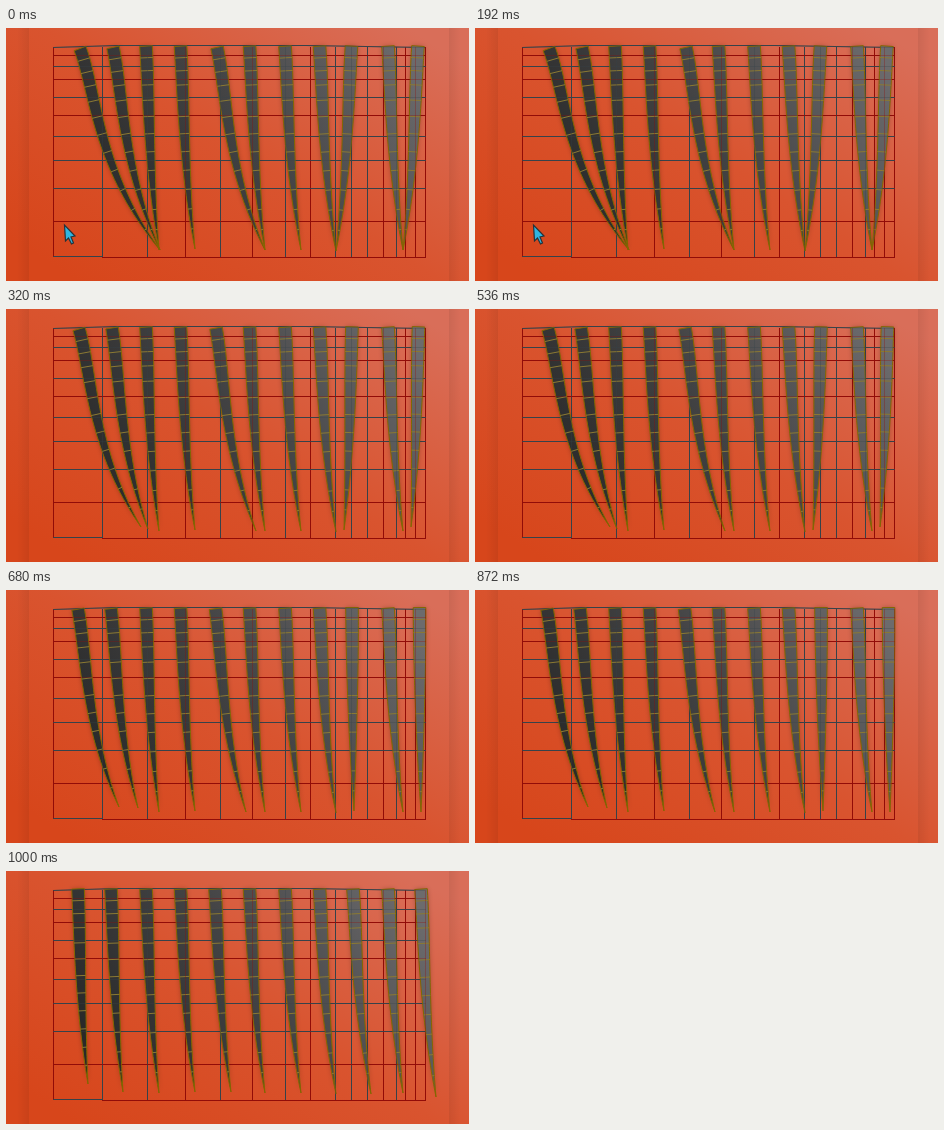
An HTML page with a canvas that plays this animation: 463x253 px, repeating every 1320 ms.

```html
<!DOCTYPE html>
<html lang="en">
<head>
<meta charset="utf-8">
<title>Bending blades</title>
<style>
html, body { margin: 0; width: 100%; height: 100%; overflow: hidden; background: #d9501f; }
canvas { display: block; width: 463px; height: 253px; }
</style>
</head>
<body>
<canvas id="stage" width="463" height="253"></canvas>
<script>
const ctx = document.getElementById('stage').getContext('2d');
const LOOP = 1320;
const POSE_STARTS = [0, 320, 680, 1000];
const RED = '#920d08', SLATE = '#37424a', OLIVE = '#836700';

const columns = [47, 96, 141, 179, 214, 246, 279, 304, 329, 345, 361, 377, 390, 399, 409, 419];
const rows = [19, 27, 38, 51, 69, 87, 108, 132, 160, 193, 228];
const redColumns = [47, 179, 246, 304, 377, 399, 409, 419];
const redRows = [27, 51, 87, 193];

// Each blade: resting top x, resting tip [x, y], and, if it moves, earlier [top x, tip x, tip y] poses.
const blades = [
  { top: 72, tip: [82, 213], bent: [[74, 154, 222], [73, 135, 218], [72, 113, 217]] },
  { top: 105, tip: [117, 221], bent: [[107, 154, 222], [106, 142, 220], [105, 132, 218]] },
  { top: 140, tip: [153, 222] },
  { top: 174.5, tip: [189, 221] },
  { top: 209, tip: [225, 221], bent: [[211, 259, 222], [210, 250, 222], [209.5, 240, 222]] },
  { top: 243.5, tip: [259, 222] },
  { top: 279, tip: [295, 222] },
  { top: 313.5, tip: [330, 223] },
  { top: 347, tip: [365, 223], bent: [[345.5, 330, 223], [346, 338, 221], [346, 348, 221]] },
  { top: 382, tip: [397, 222] },
  { top: 415, tip: [430, 226], bent: [[412, 397, 222], [412.5, 405, 218], [413.5, 415, 222]] }
];

function gradient(x0, y0, x1, y1, ...colors) {
  const g = ctx.createLinearGradient(x0, y0, x1, y1);
  colors.forEach((c, i) => g.addColorStop(i / (colors.length - 1), c));
  return g;
}

const backdrop = gradient(130, 290, 340, -40, '#d7461b', '#d9542f', '#d96e59');
const metal = gradient(110, 210, 400, 20, '#292929', '#444445', '#6c6b6d');

function drawBackdrop() {
  ctx.fillStyle = backdrop;
  ctx.fillRect(0, 0, 463, 253);
  ctx.fillStyle = gradient(11, 0, 23, 0, '#0000', '#0001');
  ctx.fillRect(11, 0, 12, 253);
  ctx.fillStyle = gradient(443, 0, 455, 0, '#0001', '#0000');
  ctx.fillRect(443, 0, 12, 253);
}

function drawGrid(alpha) {
  ctx.globalAlpha = alpha;
  const [left, right] = [columns[0], columns.at(-1)];
  const [top, bottom] = [rows[0], rows.at(-1)];
  for (const x of columns) {
    ctx.fillStyle = redColumns.includes(x) ? RED : SLATE;
    ctx.fillRect(x, top, 1, bottom - top + 1);
  }
  for (const y of rows) {
    ctx.fillStyle = redRows.includes(y) ? RED : SLATE;
    if (y !== top && y !== bottom) ctx.fillRect(left, y, right - left + 1, 1);
  }
  // The outer rows bow slightly and change colour along their length.
  ctx.fillStyle = SLATE;
  ctx.fillRect(left, bottom, 49, 1);
  ctx.fillStyle = RED;
  ctx.fillRect(96, bottom + 1, right - 95, 1);
  ctx.lineWidth = 1;
  ctx.strokeStyle = SLATE;
  ctx.beginPath();
  ctx.moveTo(left, 19.5);
  ctx.lineTo(110, 17.5);
  ctx.lineTo(300, 17.5);
  ctx.lineTo(right, 19.5);
  ctx.stroke();
  ctx.globalAlpha = 1;
}

// Point on the blade's spine plus the half-width offset along its normal.
function spine(topX, tipX, tipY, t) {
  const dx = tipX - topX, u = 1 - t, bend = 0.2 * dx;
  const y0 = 17.5 + Math.min(3, Math.abs(dx) / 25), y1 = 62, y2 = 140;
  const x = topX + bend * 3 * u * t + dx * t ** 3;
  const y = u ** 3 * y0 + 3 * u * u * t * y1 + 3 * u * t * t * y2 + t ** 3 * tipY;
  const vx = bend * 3 * (1 - 2 * t) + 3 * dx * t * t;
  const vy = 3 * (u * u * (y1 - y0) + 2 * u * t * (y2 - y1) + t * t * (tipY - y2));
  const half = 6.3 * (1 - t ** 2.2) / Math.hypot(vx, vy);
  return { x, y, nx: vy * half, ny: -vx * half };
}

function drawBlade(blade, pose) {
  const [topX, tipX, tipY] = blade.bent?.[pose] ?? [blade.top, ...blade.tip];
  const points = Array.from({ length: 41 }, (_, i) => spine(topX, tipX, tipY, i / 40));
  ctx.beginPath();
  points.forEach(p => ctx.lineTo(p.x - p.nx, p.y - p.ny));
  points.toReversed().forEach(p => ctx.lineTo(p.x + p.nx, p.y + p.ny));
  ctx.closePath();
  ctx.fillStyle = metal;
  ctx.shadowColor = '#0004';
  ctx.shadowBlur = 5;
  ctx.fill();
  ctx.shadowBlur = 0;
  ctx.strokeStyle = OLIVE;
  ctx.lineWidth = 1;
  ctx.stroke();

  ctx.beginPath();
  for (let i = 1; i < 12; i++) {
    const p = spine(topX, tipX, tipY, i / 12);
    ctx.moveTo(p.x - p.nx, p.y - p.ny);
    ctx.lineTo(p.x + p.nx, p.y + p.ny);
  }
  ctx.strokeStyle = '#8b7932';
  ctx.stroke();
}

function drawCursor() {
  const arrow = new Path2D('M58.5 197 L59.5 213 L62.5 210 L65.5 216 L67.5 215 L65 209 L69 208 Z');
  ctx.fillStyle = '#2fb4e0';
  ctx.fill(arrow);
  ctx.strokeStyle = '#263238';
  ctx.lineWidth = 1.2;
  ctx.stroke(arrow);
}

function render(now) {
  const time = now % LOOP;
  const pose = POSE_STARTS.findLastIndex(start => time >= start);
  drawBackdrop();
  drawGrid(1);
  blades.forEach(blade => drawBlade(blade, pose));
  drawGrid(0.3);
  if (pose === 0) drawCursor();
}

function tick() {
  render(performance.now());
  requestAnimationFrame(tick);
}
tick();
</script>
</body>
</html>
```
